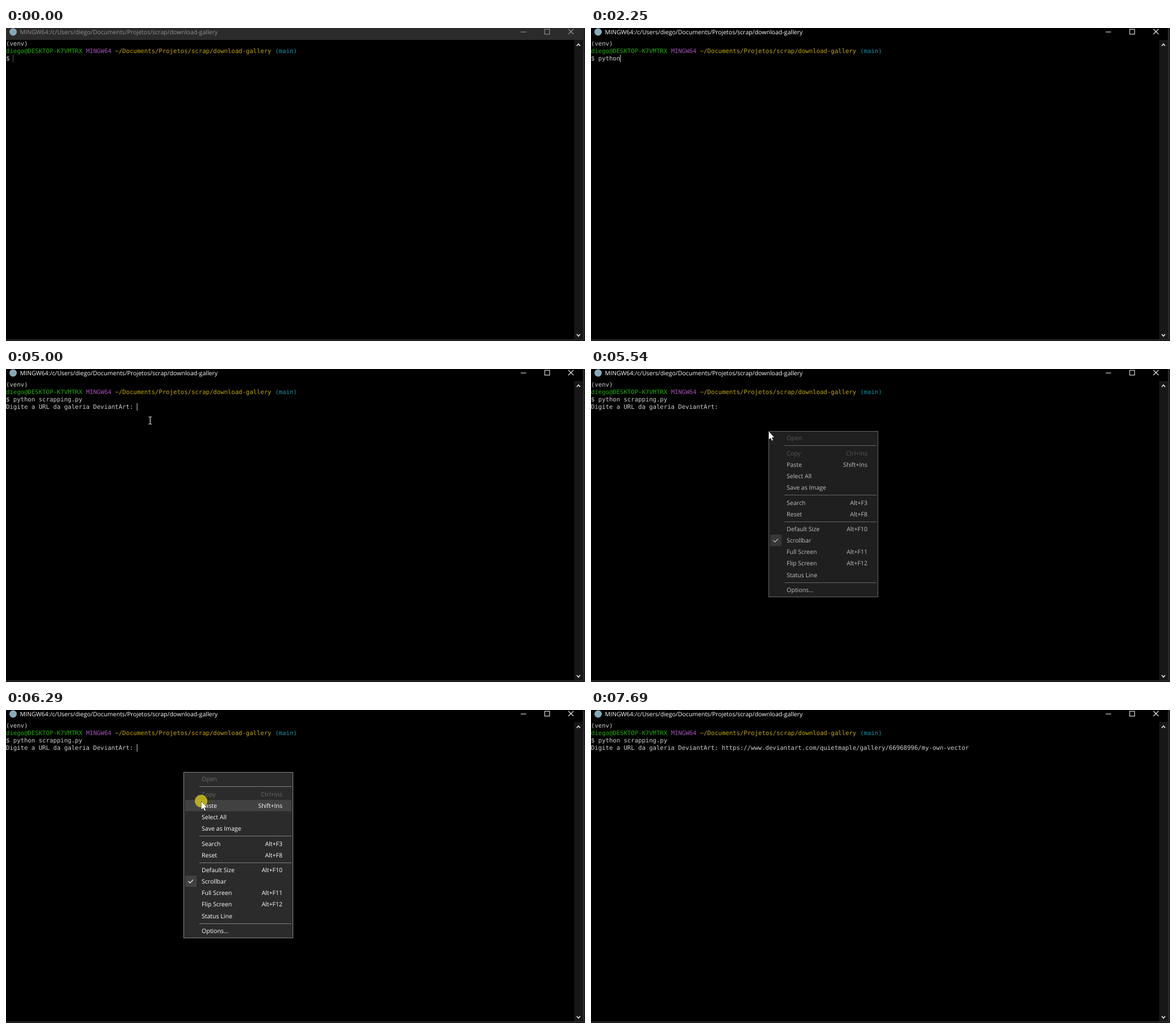
Animation of 1018 by 550 pixels, one loop 8 s. Source, as an HTML page with a canvas:

```html
<!DOCTYPE html>
<html lang="pt">
<head>
<meta charset="utf-8">
<title>Terminal</title>
<style>
html, body { margin: 0; width: 100%; height: 100%; overflow: hidden; background: #000; }
canvas { display: block; }
</style>
</head>
<body>
<canvas id="stage" width="1018" height="550"></canvas>
<script>
const ctx = document.getElementById('stage').getContext('2d', { alpha: false });
const LOOP = 8000, COL = 6.395, ROW = 12.78, TOP = 21.6, BLINK = 530;
const MONO = '10.62px "DejaVu Sans Mono", monospace';
const UI = '10.54px "Open Sans", sans-serif';
const FG = '#d0d0d0';
const FOCUS = 850, PROMPT = 3920, MENU = 5380, PASTE = 6360, ENTER = 7690;

const question = 'Digite a URL da galeria DeviantArt: ';
const url = 'https://www.deviantart.com/quietmaple/gallery/66968996/my-own-vector';

// [time, row, text]: every edit restarts the caret blink
const edits = [
  [0, 2, '$ '], [FOCUS, 2, '$ '],
  [1710, 2, '$ p'], [1850, 2, '$ py'],
  [2050, 2, '$ pyt'], [2180, 2, '$ pytho'], [2250, 2, '$ python'],
  [2510, 2, '$ python '], [2640, 2, '$ python s'],
  [2840, 2, '$ python sc'], [2970, 2, '$ python scr'], [3100, 2, '$ python scrapping.py '],
  [PROMPT, 3, question], [PASTE, 3, question + url]
];

// [time, x, y] of the mouse
const path = [
  [110, 663, 362], [440, 381.5, 139], [4649, 381.5, 139],
  [4650, 371, 136], [4860, 116.5, 49], [5070, 312, 109],
  [5680, 312, 109], [5950, 341, 158], [6089, 341, 158], [6090, 343, 160],
  [PASTE, 343, 160], [6690, 518.5, 193]
];

const items = [
  ['Open', '', 'off'], null,
  ['Copy', 'Ctrl+Ins', 'off'], ['Paste', 'Shift+Ins'], ['Select All'], ['Save as Image'], null,
  ['Search', 'Alt+F3'], ['Reset', 'Alt+F8'], null,
  ['Default Size', 'Alt+F10'], ['Scrollbar', '', 'check'], ['Full Screen', 'Alt+F11'],
  ['Flip Screen', 'Alt+F12'], ['Status Line'], null,
  ['Options...']
];

const clamp = v => Math.max(0, Math.min(1, v));

function rect(color, x, y, w, h) {
  ctx.fillStyle = color;
  ctx.fillRect(x, y, w, h);
}

function text(str, x, y, color, font, align = 'left') {
  ctx.font = font;
  ctx.fillStyle = color;
  ctx.textAlign = align;
  ctx.fillText(str, x, y);
}

function line(color, width, ...points) {
  ctx.strokeStyle = color;
  ctx.lineWidth = width;
  ctx.beginPath();
  points.forEach(([x, y]) => ctx.lineTo(x, y));
  ctx.stroke();
}

function disc(color, x, y, r) {
  ctx.fillStyle = color;
  ctx.beginPath();
  ctx.arc(x, y, r, 0, Math.PI * 2);
  ctx.fill();
}

const print = (str, col, row, color = FG) =>
  text(str, col * COL, TOP + row * ROW + 9.7, color, MONO);

function mouseAt(t) {
  const i = path.findIndex(p => p[0] > t);
  if (i < 0) return path[path.length - 1].slice(1);
  const [t0, x0, y0] = path[Math.max(0, i - 1)], [t1, x1, y1] = path[i];
  const stepped = Math.floor((t - t0) / 66) * 66;
  const k = clamp(stepped / (t1 - t0));
  const e = t < 440 ? 1 - (1 - k) ** 2 : k * k * (3 - 2 * k);
  return [x0 + (x1 - x0) * e, y0 + (y1 - y0) * e];
}

function drawWindow(active) {
  const ink = active ? '#fff' : '#a0a0a0';
  rect('#000', 0, 0, 1018, 550);
  if (!active) rect('#2b2b2b', 0, 0, 1014, 21);
  disc('#86a9b8', 12.5, 7, 6.5);
  text('MINGW64:/c/Users/diego/Documents/Projetos/scrap/download-gallery', 24.5, 10.8,
    active ? '#fff' : '#929292', UI);
  line(ink, 1, [905, 7], [914.5, 7]);
  ctx.strokeRect(947.2, 2.2, 8.6, 8.6);
  line(ink, 1.2, [988.7, 1.8], [997.8, 10.9]);
  line(ink, 1.2, [997.8, 1.8], [988.7, 10.9]);

  rect('#171717', 999, 21, 15, 526);
  line('#e8e8e8', 1.6, [1003.5, 31.5], [1006.5, 28], [1009.5, 31.5]);
  line('#e8e8e8', 1.6, [1003.5, 538], [1006.5, 541.5], [1009.5, 538]);
  rect('#1c1a1a', 1014, 0, 4, 550);
  rect('#3a3a3a', 1015, 0, 1, 548);
  rect('#1c1717', 0, 548, 1018, 2);
  rect('#333', 0, 547, 1015, 1);
}

function drawTerminal(t) {
  print('(venv)', 0, 0);
  print('diego@DESKTOP-K7VMTRX', 0, 1, '#1cb000');
  print('MINGW64', 22, 1, '#a452b4');
  print('~/Documents/Projetos/scrap/download-gallery', 30, 1, '#c8a800');
  print('(main)', 74, 1, '#0e96aa');

  const done = edits.filter(e => e[0] <= t);
  const [since, row, str] = done[done.length - 1];
  if (row === 3) print('$ python scrapping.py', 0, 2);
  print(str, 0, row);

  const x = Math.floor(str.length * COL), y = Math.round(TOP + row * ROW);
  if (t < FOCUS) {
    for (let i = 0; i < 13; i += 2) rect('#999', x, y + i, 1, 1);
  } else if (t < ENTER && Math.floor((t - since) / BLINK) % 2 === 0) {
    rect('#d0d0d0', x, y, 1, 13);
  }
}

function drawItem([label, keys = '', state], y, hover) {
  const color = state === 'off' ? '#6d6d6d' : '#fff';
  if (hover) rect('#414141', 315, Math.round(y - 10), 187, 20);
  if (state === 'check') {
    rect('#414141', 315, Math.round(y - 10), 20, 20);
    line('#fff', 1.2, [320.5, y - 0.5], [323.5, y + 2.5], [329, y - 3]);
  }
  text(label, 344, y + 3.8, color, UI);
  text(keys, 486, y + 3.8, color, UI, 'right');
}

function drawMenu(t, mouseY) {
  if (t < MENU || t >= 6690) return;
  const open = t < PASTE;
  ctx.globalAlpha = open ? clamp((t - MENU) / 222) : 0.85 * clamp(1 - (t - PASTE) / 310);
  if (open) {
    rect('#2b2b2b', 312, 109, 193, 292);
    ctx.strokeStyle = '#858585';
    ctx.lineWidth = 1;
    ctx.strokeRect(312.5, 109.5, 192, 291);
  }
  let y = 111.4;
  for (const item of items) {
    const paste = item && item[0] === 'Paste';
    if (!item) {
      if (open) rect('#808080', 340, Math.floor(y + 3.2), 162, 1);
      y += 6.4;
    } else {
      if (open || paste) drawItem(item, y + 10.05, paste && (!open || mouseY >= 157));
      y += 20.1;
    }
  }
  ctx.globalAlpha = 1;
}

function drawMouse(t, x, y) {
  if (t < 110 || (t >= 1780 && t < 4650) || t >= ENTER) return;
  const within = (from, to) => t >= from && t < to;
  if (within(FOCUS, 920) || within(5340, 5410)) disc('rgba(255,238,0,.51)', x, y, 11);
  if (within(6290, PASTE)) disc('rgba(232,216,20,.72)', x, y, 11);

  ctx.save();
  if (within(MENU, PASTE)) {
    ctx.translate(Math.round(x) + 0.5, Math.round(y) + 0.5);
    const arrow = new Path2D('M0 0V14.5L3.3 11.5 5.6 16.5 7.6 15.6 5.4 10.7H9.7Z');
    ctx.strokeStyle = '#000';
    ctx.lineWidth = 1;
    ctx.stroke(arrow);
    ctx.fillStyle = '#fff';
    ctx.fill(arrow);
  } else {
    ctx.translate(Math.floor(x + 2) + 0.5, Math.round(y) + 0.5);
    line('#e8e8e8', 1.2, [0, -6], [0, 6]);
    for (const end of [-6.5, 6.5]) line('#e8e8e8', 1, [-3, end], [-0.5, end * 0.95], [0.5, end * 0.95], [3, end]);
  }
  ctx.restore();
}

function frame(now) {
  const t = now % LOOP;
  const [x, y] = mouseAt(t);
  ctx.textRendering = 'geometricPrecision';
  drawWindow(t >= FOCUS);
  drawTerminal(t);
  drawMenu(t, y);
  drawMouse(t, x, y);
  requestAnimationFrame(frame);
}
requestAnimationFrame(frame);
</script>
</body>
</html>
```
